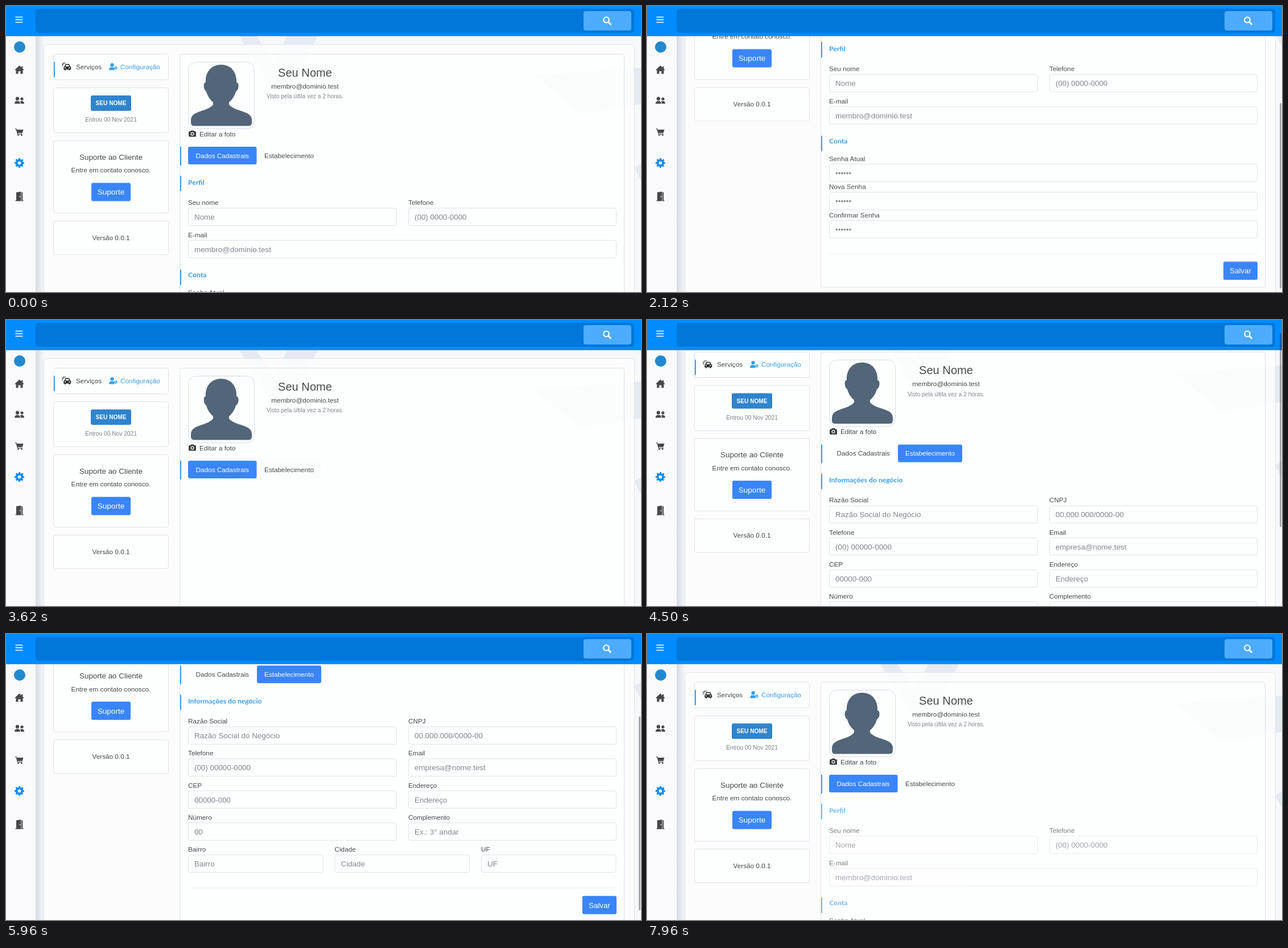
An HTML page that plays this animation: 1116 px wide and 502 px high, repeating every 8000 ms.

```html
<!DOCTYPE html>
<html lang="pt-BR">
<head>
<meta charset="utf-8">
<title>Configuração</title>
<style>
  html, body { margin: 0; width: 100%; height: 100%; overflow: hidden; background: #f6f8fb; }
  svg { display: block; width: 1116px; height: 502px; font-family: "Liberation Sans", Arial, sans-serif; }
  .title { font-family: Lato, sans-serif; font-weight: 700; }
</style>
</head>
<body>
<svg id="stage" viewBox="0 0 1116 502">
  <defs>
    <linearGradient id="shade">
      <stop offset="0" stop-color="#3c465a" stop-opacity=".16"/>
      <stop offset="1" stop-color="#3c465a" stop-opacity="0"/>
    </linearGradient>
  </defs>
  <g id="page">
    <g fill="#e6eaf1">
      <path d="M410 53H440L500 145L470 150ZM494 53H548L512 120H462Z"/>
      <path d="M930 122L1116 108V172L1010 190ZM1104 284L1116 276V306Z"/>
    </g>
  </g>
  <g id="frame"></g>
</svg>
<script>
const LOOP = 8000;
const BLUE = '#3985f9', SKY = '#379ff0', INK = '#47484b', HINT = '#828790', LINE = '#dde2ea';
const SMALL = 11.75, MEDIUM = 13.4, TINY = 10.2;
const page = document.getElementById('page');
const frame = document.getElementById('frame');

function add(parent, tag, attrs = {}) {
  const el = document.createElementNS('http://www.w3.org/2000/svg', tag);
  for (const name in attrs) el.setAttribute(name, attrs[name]);
  parent.append(el);
  return el;
}
const group = (parent, attrs) => add(parent, 'g', attrs);
const path = (parent, d, attrs) => add(parent, 'path', { d, ...attrs });
const disc = (parent, cx, cy, r, attrs) => add(parent, 'circle', { cx, cy, r, ...attrs });

function box(parent, left, top, right, bottom, fill, rx = 0, attrs = {}) {
  return add(parent, 'rect', { x: left, y: top, width: right - left, height: bottom - top, fill, rx, ...attrs });
}
function outline(parent, left, top, right, bottom, fill = '#fdfefe40', rx = 4) {
  return box(parent, left + .5, top + .5, right - .5, bottom - .5, fill, rx, { stroke: LINE });
}
// y is the middle of the capital letters
function text(parent, x, y, content, size = SMALL, fill = INK, attrs = {}) {
  const el = add(parent, 'text', { x, y: y + size * .36, 'font-size': size, fill, ...attrs });
  el.textContent = content;
  return el;
}
const centered = { 'text-anchor': 'middle' };

function button(parent, left, top, right, bottom, label, size, fill = BLUE, attrs = {}) {
  box(parent, left, top, right, bottom, fill, 3);
  text(parent, (left + right) / 2, (top + bottom) / 2, label, size, '#fff', { ...centered, ...attrs });
}
function heading(parent, barTop, y, label) {
  box(parent, 306, barTop, 308, barTop + 27, SKY);
  text(parent, 320, y, label, 12.2, SKY, { class: 'title' });
}
function field(parent, left, right, y, label, hint) {
  text(parent, left, y, label);
  outline(parent, left, y + 9.3, right, y + 41, undefined, 3.5);
  text(parent, left + 11, y + 25.3, hint, MEDIUM, HINT);
}
function saveRow(parent, y) {
  box(parent, 320, y, 1073, y + 1, '#eceff3');
  button(parent, 1013, y + 14.5, 1073, y + 46.5, 'Salvar', MEDIUM);
}

function animate(el, prop, steps, format = v => v) {
  const last = steps[steps.length - 1];
  const all = last[0] < LOOP ? [...steps, [LOOP, last[1]]] : steps;
  el.animate(all.map(([time, v]) => ({ offset: time / LOOP, [prop]: format(v) })),
    { duration: LOOP, iterations: Infinity });
}

function buildMenuCards() {
  outline(page, 83, 84, 286, 130);
  box(page, 84, 98, 86, 125, SKY);
  text(page, 123, 106.5, 'Serviços');
  text(page, 201, 106.5, 'Configuração', SMALL, SKY);

  const car = group(page, { fill: '#333', transform: 'translate(98 99)' });
  path(car, 'M4 8L6 3.5Q6.4 2.8 7.2 2.8H12Q12.8 2.8 13.3 3.5L15 7Q16.3 7.6 16.3 9V12.5H14.5V14H12.3V12.5H7V14H4.8V12.5H3.2V9Q3.2 8.3 4 8Z');
  path(car, 'M6.2 7L7.3 4.4H12L13.2 7Z', { fill: '#fdfefe' });
  path(car, 'M0 3L3 3.5M2.5 .5L4.3 2.5M.2 6.5L2.6 5.5M5.8 0L5.8 1.8', { stroke: '#333', 'stroke-width': 1.3 });
  disc(car, 6, 9.5, 1, { fill: '#fdfefe' });
  disc(car, 13.3, 9.5, 1, { fill: '#fdfefe' });

  const user = group(page, { fill: SKY, transform: 'translate(181 100)' });
  disc(user, 5.5, 3.4, 3.2);
  path(user, 'M0 12.5Q0 7.5 4 7.5H7Q9 7.5 9.4 9V12.5Z');
  gear(user, 12, 9, .36, SKY);

  outline(page, 83, 143, 286, 223);
  button(page, 149, 157, 220, 184, 'SEU NOME', 10.1, '#2f84ce', { 'font-weight': 700 });
  text(page, 184.5, 199.5, 'Entrou 00 Nov 2021', TINY, '#7d8187', centered);

  outline(page, 83, 236, 286, 364);
  text(page, 184.5, 265, 'Suporte ao Cliente', MEDIUM, INK, centered);
  text(page, 184.5, 288, 'Entre em contato conosco.', SMALL, INK, centered);
  button(page, 150, 310.5, 219, 342.5, 'Suporte', 13.6);

  outline(page, 83, 377, 286, 437);
  text(page, 184.5, 406.5, 'Versão 0.0.1', SMALL, INK, centered);
}

function buildProfile() {
  box(page, 320.5, 98.5, 436.5, 215.5, '#fdfefe', 13, { stroke: '#d5deec' });
  path(page, 'M378 103C396 103 406 117 405 134C410 134 410 147 404 150C402 158 397 165 392 169V173' +
    'C397 180 411 183 421 187Q432 191 432 200V205Q432 210.500 426 210.500H331Q325 210.500 325 205V200' +
    'Q325 191 336 187C346 183 359 180 364 173V169C359 165 354 158 352 150C347 147 346 134 351 134' +
    'C350 117 360 103 378 103Z', { fill: '#526579' });
  text(page, 525.5, 116.5, 'Seu Nome', 20.1, INK, centered);
  text(page, 525.5, 140.5, 'membro@dominio.test', SMALL, INK, centered);
  text(page, 525.5, 158.5, 'Visto pela últila vez a 2 horas.', TINY, HINT, centered);

  path(page, 'M321 221.500Q321 220 322.500 220H324L325 218.500H330L331 220H332.500Q334 220 334 221.500V228Q334 229.500 332.500 229.500H322.500Q321 229.500 321 228Z', { fill: '#3d3f43' });
  disc(page, 327.5, 224.5, 2.4, { fill: 'none', stroke: '#fff', 'stroke-width': 1.2 });
  text(page, 340, 224.5, 'Editar a foto');
  box(page, 306, 247, 308, 280, SKY);
}

function tabButton(left, right, label, activity) {
  const back = box(page, left, 247, right, 278, BLUE, 3);
  const caption = text(page, (left + right) / 2, 262.3, label, SMALL, INK, centered);
  animate(back, 'opacity', activity);
  animate(caption, 'fill', activity, on => on ? '#ffffff' : INK);
}

function buildAccountTab() {
  const tab = group(page);
  heading(tab, 298, 309.5, 'Perfil');
  field(tab, 320, 687, 345, 'Seu nome', 'Nome');
  field(tab, 707, 1073, 345, 'Telefone', '(00) 0000-0000');
  field(tab, 320, 1073, 401.5, 'E-mail', 'membro@dominio.test');
  heading(tab, 462.7, 471.3, 'Conta');
  ['Senha Atual', 'Nova Senha', 'Confirmar Senha'].forEach((label, i) =>
    field(tab, 320, 1073, 502.5 + 49.6 * i, label, '••••••'));
  saveRow(tab, 669);
  return tab;
}

function buildBusinessTab() {
  const tab = group(page);
  heading(tab, 298, 309.5, 'Informações do negócio');
  [
    ['Razão Social', 'Razão Social do Negócio', 'CNPJ', '00.000.000/0000-00'],
    ['Telefone', '(00) 00000-0000', 'Email', 'empresa@nome.test'],
    ['CEP', '00000-000', 'Endereço', 'Endereço'],
    ['Número', '00', 'Complemento', 'Ex.: 3° andar']
  ].forEach(([label, hint, label2, hint2], i) => {
    const y = 344.6 + 56.25 * i;
    field(tab, 320, 687, y, label, hint);
    field(tab, 707, 1073, y, label2, hint2);
  });
  ['Bairro', 'Cidade', 'UF'].forEach((label, i) =>
    field(tab, 320 + 257.5 * i, 557.5 + 257.5 * i, 569.6, label, label));
  saveRow(tab, 637);
  return tab;
}

function gear(parent, x, y, scale, fill) {
  const g = group(parent, { transform: `translate(${x} ${y}) scale(${scale})`, fill: 'none', stroke: fill });
  disc(g, 0, 0, 4.8, { 'stroke-width': 3.8 });
  disc(g, 0, 0, 7.2, { 'stroke-width': 2.6, 'stroke-dasharray': '2.827', 'stroke-dashoffset': 1.41 });
}

function buildFrame() {
  box(frame, 0, 53, 52, 502, '#fafafc');
  box(frame, 52, 53, 67, 502, 'url(#shade)');
  box(frame, 0, 0, 1116, 53, '#008cff');
  box(frame, 52, 5, 1104, 47, '#0077d9', 5);
  box(frame, 1015, 9, 1099, 43, '#4dacff', 4);
  path(frame, 'M16.500 19.500H29.500M16.500 24H29.500M16.500 28.500H29.500', { stroke: '#fff', 'stroke-width': 1.6 });
  disc(frame, 1055, 24.3, 4.8, { fill: 'none', stroke: '#fff', 'stroke-width': 2.2 });
  path(frame, 'M1058.500 28L1062.500 32', { stroke: '#fff', 'stroke-width': 2.6, 'stroke-linecap': 'round' });

  disc(frame, 24, 72, 10, { fill: '#2389cf' });

  const icons = group(frame, { fill: '#45474b' });
  path(icons, 'M23.500 104.500L31.500 112L30.500 113L29.500 112.200V119H25.500V114.500H21.500V119H17.500V112.200L16.500 113L15.500 112Z');
  path(icons, 'M27 106H29.500V110L27 108Z');
  disc(icons, 20, 162.7, 3.1);
  disc(icons, 28, 163, 2.6);
  path(icons, 'M15 171.500Q15 166.800 20 166.800Q25 166.800 25 171.500ZM26 171.500Q26.200 168.500 24.800 167.200Q31.800 165.600 32 171.500Z');
  path(icons, 'M16 215H18.300L19 217H30.500L28.800 223H20.600L21 224.300H29V225.500H20L17.600 216.200H16Z');
  disc(icons, 21.5, 226.8, 1.3);
  disc(icons, 27.5, 226.8, 1.3);
  gear(frame, 23.5, 275.5, 1, '#0c8cf5');
  path(icons, 'M18 327L26.500 325.800V342.500H16.500V341.300H18ZM27.300 327H29.300V341.300H30.500V342.500H27.300Z');
  disc(icons, 24.5, 334.5, .9, { fill: '#fff' });
}

const SCROLL = [
  [0, 0], [470, 0], [640, 84], [860, 150], [920, 171.4], [960, 215], [1000, 241],
  [2090, 241], [2120, 235.5], [2170, 200], [2260, 115], [2330, 73],
  [2470, 73], [2540, 45], [2620, 12], [2670, 0],
  [4430, 0], [4640, 84], [4860, 167], [4960, 200], [5000, 206], [5040, 209],
  [5930, 209], [6080, 125], [6190, 41], [6250, 17], [6310, 5], [6370, 0]
];
const FADE_IN = [[0, 0], [80, .095], [200, .41], [340, .71], [400, .8], [600, .96], [800, 1]];
const [toBusiness, toAccount] = [3620, 7620];
const after = start => FADE_IN.map(([time, v]) => [start + time, v]);

outline(page, 66, 67, 1105, 743, '#fdfdfddc', 6);
buildMenuCards();
const panel = outline(page, 305, 84, 1087, 729);
buildProfile();

const first = [[0, 1], [toBusiness, 1], [toBusiness + 150, 0], [toAccount, 0], [toAccount + 150, 1]];
tabButton(320, 440.5, 'Dados Cadastrais', first);
tabButton(441, 554, 'Estabelecimento', first.map(([time, v]) => [time, 1 - v]));

// the second fade is cut by the end of the loop
const cutFade = [...after(toAccount).filter(([time]) => time < LOOP), [LOOP, .78]];
animate(buildAccountTab(), 'opacity', [[0, 1], [toBusiness, 1], [toBusiness, 0], ...cutFade]);
animate(buildBusinessTab(), 'opacity', [[0, 0], [toBusiness, 0], ...after(toBusiness), [toAccount, 1], [toAccount, 0]]);
const stepped = (a, b) => [[0, a], [toBusiness, a], [toBusiness, b], [toAccount, b], [toAccount, a]];
animate(panel, 'height', stepped(644, 612.5), v => v + 'px');

buildFrame();

const thumb = box(frame, 1112, 2, 1115, 327, '#00000050', 1);
const px = v => `translateY(${v}px)`;
animate(page, 'transform', SCROLL, v => px(-v));
animate(thumb, 'transform', SCROLL.map(([time, v]) =>
  [time, v * (time > toBusiness && time < toAccount ? .746 : .718)]), px);
animate(thumb, 'height', stepped(325, 340), v => v + 'px');

const shown = [[500, 1300, 1620], [2120, 2930, 3250], [4460, 5300, 5580], [5960, 6720, 7000]];
animate(thumb, 'opacity', [[0, 0], ...shown.flatMap(([on, fade, off]) =>
  [[on, 0], [on, 1], [fade, 1], [off, 0]])]);
</script>
</body>
</html>
```
